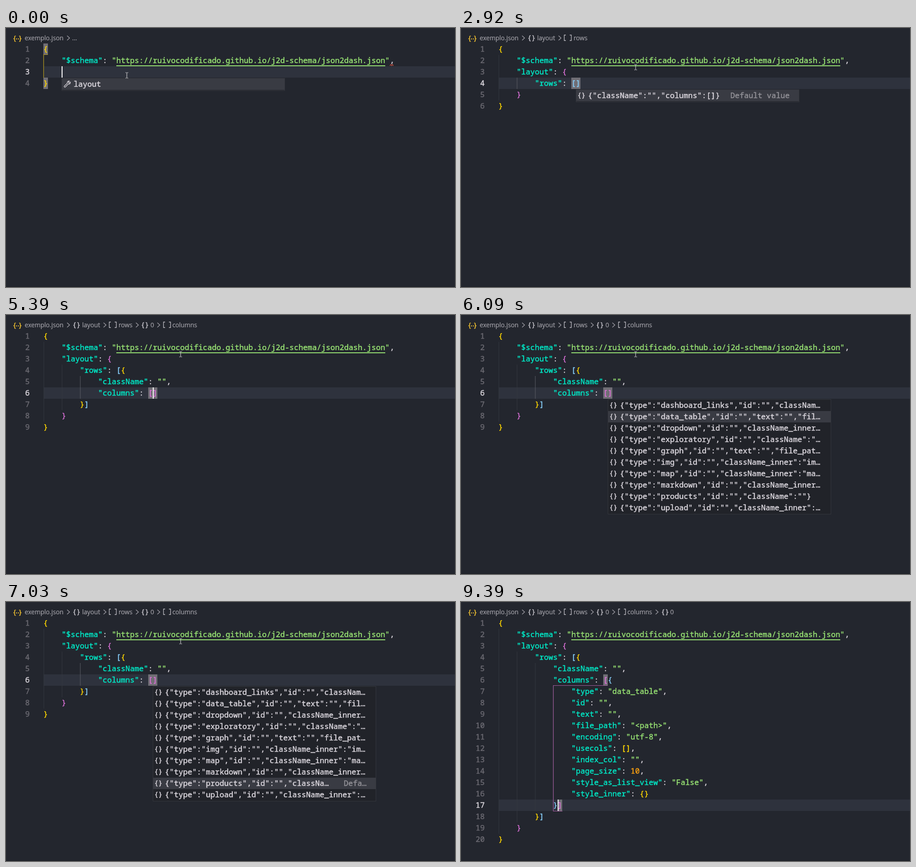
Recreate the animation shown at these times as an HTML page with a canvas. Size 985 by 569 pixels, loop 9.49 s.

```html
<!DOCTYPE html>
<html lang="pt">
<head>
<meta charset="utf-8">
<title>exemplo.json</title>
<style>
  html, body { margin: 0; width: 100%; height: 100%; overflow: hidden; background: #23262e; }
  canvas { display: block; }
</style>
</head>
<body>
<canvas id="stage" width="985" height="569"></canvas>
<script>
const ctx = document.getElementById('stage').getContext('2d');
const LOOP = 9490, CELL = 10, ROW = 25, LEFT = 82, TOP = 34, BASE = 18;
const CODE = '16.667px "Noto Sans Mono", monospace';
const ICON = '14.5px "Noto Sans Mono", monospace';
const LABEL = '13.7px "Open Sans", "Noto Sans", sans-serif';
const C = {
  bg: '#23262e', row: '#2e323d', text: '#d9d5dc', key: '#00e8c6', string: '#96e072',
  number: '#f39c12', gutter: '#696870', indent: '#343841', active: '#5c5e66',
  mark: '#706e75', popup: '#212329', border: '#34363d', selected: '#393b43',
  crumb: '#a4a3aa', icon: '#c3c1c8', note: '#929197',
  pink: '#a45c9f', gold: '#b79b1c', blue: '#6597ba'
};
const BRACKETS = ['#ffd700', '#da70d6', '#87cefa'];

const URL_TEXT = 'https://ruivocodificado.github.io/j2d-schema/json2dash.json';
const pad = (n, s) => ' '.repeat(n) + s;
const wrap = body => ['{', pad(4, `"$schema": "${URL_TEXT}",`), ...body, '}'];
const inLayout = body => wrap([pad(4, '"layout": {'), ...body, pad(4, '}')]);
const inRow = body => inLayout([pad(8, '"rows": [{'), pad(12, '"className": "",'), ...body, pad(8, '}]')]);

const docs = {
  start: wrap(['']),
  layout: inLayout([pad(8, '"rows": []')]),
  row: inRow([pad(12, '"columns": []')]),
  table: inRow([
    pad(12, '"columns": [{'),
    ...['"type": "data_table",', '"id": "",', '"text": "",', '"file_path": "<path>",',
      '"encoding": "utf-8",', '"usecols": [],', '"index_col": "",', '"page_size": 10,',
      '"style_as_list_view": "False",', '"style_inner": {}'].map(s => pad(16, s)),
    pad(12, '}]')
  ])
};

const component = (type, rest) => `{"type":"${type}","id":"",${rest}}`;
const inner = type => component(type, `"className_inner":"${type}_inner","className":""`);
const components = [
  component('dashboard_links', '"className":""'),
  component('data_table', '"text":"","file_path":"<path>"'),
  inner('dropdown'),
  component('exploratory', '"className":""'),
  component('graph', '"text":"","file_path":"<path>"'),
  inner('img'), inner('map'), inner('markdown'),
  component('products', '"className":""'),
  inner('upload')
];
const rowItem = ['{"className":"","columns":[]}'];
const menu = (sel, detail) => ({ items: components, sel, detail });

// Guide: [open line, end column of opener, column, closing line, tail, colour]
const layoutGuide = [3, 15, 4, 5, 10, C.pink];
const steps = [
  [0, { doc: docs.start, line: 3, col: 4, caret: true, crumbs: 0, depth: 9, rules: false,
        marks: [[1, 0], [4, 0]], guide: [1, 1, 0, 4, 0, C.gold], active: null,
        popup: { items: ['layout'], sel: 0, wrench: true }, mouse: [265, 104] }],
  [280, { doc: docs.layout, line: 5, col: 5, depth: 1, marks: [], guide: null, popup: null, mouse: null }],
  [410, { depth: 9 }],
  [540, { marks: [[3, 14], [5, 4]], guide: layoutGuide }],
  [670, { crumbs: 1 }],
  [1070, { line: 4 }],
  [1600, { col: 18 }],
  [1750, { marks: [[4, 16], [4, 17]] }],
  [1870, { crumbs: 2 }],
  [2020, { mouse: [383, 86] }],
  [2270, { col: 17 }],
  [2390, { guide: null, active: [4, 4, 4] }],
  [2660, { popup: { items: rowItem, sel: 0 } }],
  [2920, { popup: { items: rowItem, sel: 0, detail: true }, caret: false }],
  [3420, { doc: docs.row, line: 7, col: 9, caret: true, depth: 3, marks: [], active: null, popup: null }],
  [3570, { depth: 9, marks: [[4, 16], [7, 9]], guide: [4, 17, 8, 8, 20, C.blue] }],
  [3840, { col: 10 }],
  [3980, { line: 6 }],
  [4120, { marks: [[4, 17], [7, 8]], guide: [4, 18, 8, 7, 10, C.gold] }],
  [4270, { crumbs: 3 }],
  [4840, { col: 25 }],
  [4980, { marks: [[6, 23], [6, 24]] }],
  [5120, { crumbs: 4 }],
  [5250, { col: 24 }],
  [5390, { guide: null, active: [8, 5, 6] }],
  [5800, { popup: menu(0, false) }],
  [5950, { popup: menu(0, true), caret: false }],
  [6090, { popup: menu(1, false) }],
  [6480, { popup: menu(2, false), caret: true }],
  [6610, { popup: menu(4, false) }],
  [6750, { popup: menu(6, false) }],
  [6890, { popup: menu(8, false), caret: false }],
  [7030, { popup: menu(8, true) }],
  [7160, { popup: menu(1, true) }],
  [7440, { doc: docs.table, line: 17, col: 13, caret: true, depth: 5, rules: true, popup: null,
           marks: [[6, 23], [17, 13]], active: [12, 7, 16] }],
  [7600, { depth: 9, rules: false, active: null, guide: [6, 24, 12, 18, 20, C.pink] }],
  [7740, { crumbs: 5 }],
  [7890, { caret: false }],
  [8260, { mouse: [392, 79] }],
  [8390, { mouse: [455, 82], caret: true }],
  [8530, { mouse: [590, 118] }],
  [8670, { mouse: [725, 208] }],
  [8800, { mouse: [820, 325] }],
  [8900, { mouse: [880, 440], caret: false }],
  [9070, { mouse: [910, 545] }],
  [9250, { mouse: null }],
  [9390, { caret: true }]
];

const stateAt = t => Object.assign({}, ...steps.filter(s => s[0] <= t).map(s => s[1]));
const px = col => LEFT + col * CELL;
const py = line => TOP + (line - 1) * ROW;

function rect(x, y, w, h, color) {
  ctx.fillStyle = color;
  ctx.fillRect(x, y, w, h);
}

// A thin outline gives the glyphs a medium weight.
function text(s, x, y, color, font = CODE, align = 'left') {
  ctx.font = font;
  ctx.textAlign = align;
  ctx.fillStyle = ctx.strokeStyle = color;
  ctx.lineWidth = font === LABEL ? 0.2 : 0.5;
  ctx.lineJoin = 'round';
  ctx.fillText(s, x, y);
  ctx.strokeText(s, x, y);
}

function stroke(points, color, width = 1) {
  ctx.strokeStyle = color;
  ctx.lineWidth = width;
  ctx.lineJoin = 'miter';
  ctx.beginPath();
  points.forEach(([x, y]) => ctx.lineTo(x, y));
  ctx.stroke();
}

const crumbs = [
  // chevron x, icon x, icon, label x, label
  [137, 146, '{}', 167, 'layout'],
  [217, 226, '[]', 247, 'rows'],
  [288, 296, '{}', 317, '0'],
  [335, 345, '[]', 365, 'columns'],
  [430, 439, '{}', 459, '0']
];

const chevron = x => stroke([[x - 3, 17], [x + 2.5, 22], [x - 3, 27]], C.crumb, 1.3);

function drawCrumbs(count) {
  const yellow = '#f2c230';
  text('{', 14.5, 26.5, yellow, ICON);
  text('}', 27, 26.5, yellow, ICON);
  rect(22, 23, 2, 2, yellow);
  rect(26, 23, 2, 2, yellow);
  text('exemplo.json', 41, 27, C.crumb, LABEL);
  if (!count) {
    chevron(137);
    text('...', 145, 27, C.crumb, LABEL);
  }
  for (const [arrow, x, icon, labelX, label] of crumbs.slice(0, count)) {
    chevron(arrow);
    if (icon === '{}') text(icon, x, 26, C.icon, ICON);
    else for (const [a, b] of [[x + 4, x + 0.5], [x + 12.5, x + 16]])
      stroke([[a, 15.5], [b, 15.5], [b, 27.5], [a, 27.5]], C.icon, 1.3);
    text(label, labelX, 27, C.crumb, LABEL);
  }
}

function drawIndents(doc, active) {
  let indent = 0;
  doc.forEach((s, i) => {
    if (s.trim()) indent = s.search(/\S/);
    for (let col = 0; col < indent; col += 4) {
      const lit = active && col === active[0] && i + 1 >= active[1] && i + 1 <= active[2];
      rect(px(col) + 0.5, py(i + 1), 1, ROW, lit ? C.active : C.indent);
    }
  });
}

function drawCode(doc, line, maxDepth) {
  let depth = 0;
  doc.forEach((s, i) => {
    const y = py(i + 1) + BASE;
    text(i + 1, 52, y, i + 1 === line ? C.text : C.gutter, CODE, 'right');
    for (const m of s.matchAll(/"[^"]*"|[{}[\]]|\d+|[:,]/g)) {
      const token = m[0];
      let color = C.text;
      if (token[0] === '"') color = s[m.index + token.length] === ':' ? C.key : C.string;
      else if (/\d/.test(token)) color = C.number;
      else if (/[{}[\]]/.test(token)) {
        const level = '{['.includes(token) ? depth++ : --depth;
        if (level < maxDepth) color = BRACKETS[level % 3];
      }
      text(token, px(m.index), y, color);
    }
  });
  rect(px(16), 82, URL_TEXT.length * CELL, 2, C.string);
}

function drawGuide([open, end, col, close, tail, color]) {
  const x = px(col) + 0.5, top = py(open + 1) - 0.5, bottom = py(close) + 0.5;
  stroke([[px(end), top], [x, top], [x, bottom], [x + tail, bottom]], color, 1.2);
}

const wrench = new Path2D('M1.5 12.5L8 6.2C7.3 3 9.5 1 12.5 1.6L10.3 4L10.8 5.6L12.3 6L14.6 3.8C15.3 7 13 9 10 8.3L3.7 14.7C2 16 .3 14 1.5 12.5Z');
const clip = (s, n) => s.length > n ? s.slice(0, n - 1) + '…' : s;

function drawPopup({ items, sel, detail, wrench: tool }, line, col) {
  const x = px(col), y = py(line + 1) + 1, width = 490;
  rect(x, y, width, items.length * ROW + 3, C.border);
  rect(x + 1, y + 1, width - 2, items.length * ROW + 1, C.popup);
  items.forEach((item, i) => {
    const top = y + 1 + i * ROW, chosen = i === sel, note = chosen && detail;
    if (chosen) rect(x + 1, top, width - 2, ROW, C.selected);
    if (tool) {
      ctx.save();
      ctx.translate(x + 4.5, top + 4);
      ctx.strokeStyle = C.text;
      ctx.lineWidth = 1.3;
      ctx.stroke(wrench);
      ctx.restore();
    } else {
      text('{}', x + 3.5, top + 16, C.text, ICON);
    }
    const label = clip(item, note ? 36 : 44);
    text(label, x + 26.5, top + BASE, C.text);
    if (note) text(clip('Default value', label.length < 30 ? 13 : 5), x + 469, top + BASE, C.note, CODE, 'right');
  });
}

function drawMouse([x, y]) {
  const ink = '#c9c9cc';
  rect(x - 0.5, y - 6, 1.2, 12, ink);
  for (const edge of [y - 6.5, y + 5.5]) {
    rect(x - 3, edge, 2.5, 1, ink);
    rect(x + 0.7, edge, 2.5, 1, ink);
  }
}

function draw(t) {
  const s = stateAt(t);
  rect(0, 0, 985, 569, C.bg);
  rect(0, 567, 985, 2, '#1e2128');
  drawCrumbs(s.crumbs);
  rect(83, py(s.line), 902, ROW, C.row);
  drawIndents(s.doc, s.active);
  s.marks.forEach(([line, col]) => rect(px(col), py(line), CELL, ROW, C.mark));
  if (s.guide) drawGuide(s.guide);
  if (s.rules) for (let n = 7; n <= 17; n++)
    rect(83, py(n + 1) - 1, px(s.doc[n - 1].length) - 83, 1.2, C.pink);
  drawCode(s.doc, s.line, s.depth);
  if (s.doc === docs.start)
    stroke([[842, 83], [844, 80], [846, 83], [848, 80], [850, 83]], '#d9523f', 1.2);
  if (s.caret) rect(px(s.col), py(s.line), 2, ROW, '#ffffff');
  if (s.popup) drawPopup(s.popup, s.line, s.col);
  if (s.mouse) drawMouse(s.mouse);
}

const begin = performance.now();
function tick() {
  draw((performance.now() - begin) % LOOP);
  requestAnimationFrame(tick);
}
tick();
</script>
</body>
</html>
```
